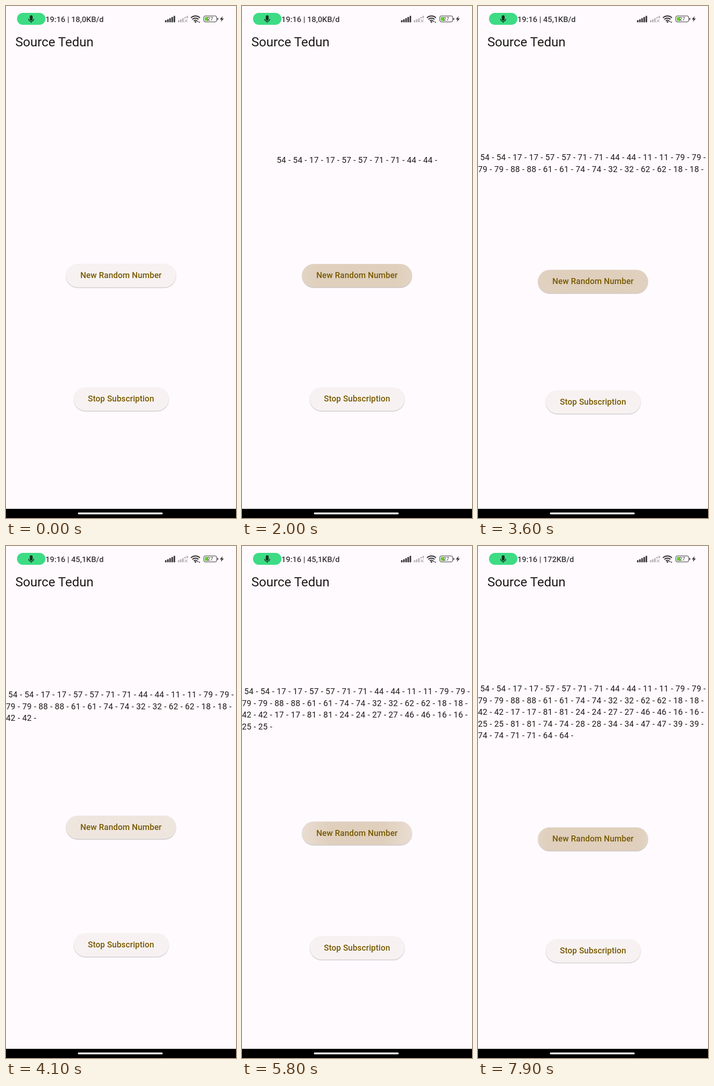
Write an HTML page that moves like this. It is 502x1116 px and loops after 8000 ms.

```html
<!DOCTYPE html>
<html lang="en">
<head>
<meta charset="utf-8">
<title>Number stream</title>
<style>
  html, body { margin: 0; width: 100%; height: 100%; overflow: hidden; }
  body {
    position: relative;
    background: #fffafe;
    color: #1d1b18;
    font-family: Roboto, sans-serif;
  }
  svg { position: absolute; left: 0; top: 0; }
  h1 {
    position: absolute; left: 20.4px; top: 60.6px; margin: 0;
    font-size: 28.1px; font-weight: 400; line-height: 36px; white-space: pre;
  }
  #list {
    position: absolute; left: 50%; top: 0; width: max-content;
    font-size: 17.9px; line-height: 25.56px; letter-spacing: .32px; white-space: pre;
  }
  .btn {
    position: absolute; top: 0; height: 51.1px; border-radius: 26px;
    background-color: #f7f2f1; color: #785900;
    font-size: 17.9px; font-weight: 500; line-height: 50.4px;
    letter-spacing: .128px; text-align: center; white-space: pre;
    box-shadow: 0 1px 2px rgba(0, 0, 0, .2), 0 1px 1px rgba(0, 0, 0, .1);
  }
  #add { left: 131px; width: 240px; }
  #stop { left: 147.5px; width: 207px; }
  #nav { position: absolute; left: 0; top: 1096px; width: 100%; height: 20px; background: #000; }
  #nav::after {
    content: ""; position: absolute; left: 157px; top: 8px;
    width: 185px; height: 4px; border-radius: 2px; background: #fff;
  }
</style>
</head>
<body>
<svg width="502" height="50" viewBox="0 0 502 50" fill="#3a383a" font-family="Roboto, sans-serif">
  <rect x="24" y="15" width="62" height="26" rx="13" fill="#3ddc84"/>
  <g fill="none" stroke="#17331f" stroke-linecap="round">
    <path d="M55 23.5v5" stroke-width="6.4"/>
    <path d="M49.4 28.5a5.6 5.2 0 0 0 11.2 0M55 34v2" stroke-width="1.6"/>
  </g>
  <text id="rate" x="86" y="35" font-size="17.1" font-weight="500"></text>
  <path d="M347 31h3.4v4.5h-3.4zM351.7 29h3.4v6.5h-3.4zM356.4 26.5h3.4v9h-3.4zM361.1 24h3.4v11.5h-3.4zM365.8 21.5h3.4v14h-3.4z"/>
  <g fill="#b9b5b9">
    <path d="M375 31h3.4v4.5h-3.4zM379.7 29h3.4v6.5h-3.4zM384.4 26.5h3.4v9h-3.4zM389.1 24h3.4v3h-3.4zM393.8 21.5h3.4v5h-3.4z"/>
    <path d="M390 29.5l6 6m0-6l-6 6" stroke="#b9b5b9" stroke-width="1.6"/>
  </g>
  <path d="M403.7 25.8a14 14 0 0 1 19.6 0M406.8 29.2a9.5 9.5 0 0 1 13.4 0M409.9 32.4a5.2 5.2 0 0 1 7.2 0"
    fill="none" stroke="#3a383a" stroke-width="2.4"/>
  <path d="M411 34.2a3.5 3.5 0 0 1 5 0l-2.5 2.8zM418.5 32l2 2.5h-4zM422 37l-2-2.5h4z"/>
  <rect x="431.7" y="21.7" width="28.2" height="13" rx="3.6" fill="none" stroke="#4a484a" stroke-width="1.3"/>
  <rect x="434" y="24" width="7.5" height="8.5" rx="1.5" fill="#62cf2c"/>
  <rect x="461.3" y="26" width="1.9" height="4.5" rx="1"/>
  <text x="445.8" y="32.2" font-size="11" text-anchor="middle">27</text>
  <path d="M473 22l-6.5 7.2h3.9l-1.7 5.6 6.8-7.6h-4z"/>
</svg>
<h1>Source Tedun</h1>
<div id="list"></div>
<div id="add" class="btn">New Random Number</div>
<div id="stop" class="btn">Stop Subscription</div>
<div id="nav"></div>
<script>
const LOOP = 8000, PER_LINE = 14, PRESS_LEAD = 60;
const values = ("54 17 57 71 44 11 79 79 88 61 74 32 62 18 42 17 81 24 27 46 16 25 " +
  "81 74 28 34 47 39 74 71 64").split(" ");
const times = [1090, 1290, 1490, 1690, 1890, 2090, 2290, 2490, 2690, 2890, 3050, 3210, 3390,
  3560, 3750, 4290, 4540, 4790, 5040, 5290, 5490, 5750, 5970, 6170, 6370, 6570, 6770, 6960,
  7160, 7460, 7760];

const $ = id => document.getElementById(id);
const list = $("list"), add = $("add"), stop = $("stop"), rate = $("rate");
const clamp = v => Math.max(0, Math.min(1, v));
const setText = (el, s) => { if (el.textContent !== s) el.textContent = s; };
const moveY = (el, y) => { el.style.transform = `translateY(${y}px)`; };

// Every value arrives twice; lines break after a fixed count.
function linesFor(count) {
  const items = values.slice(0, count).flatMap(v => [v, v]);
  const lines = [];
  for (let i = 0; i < items.length; i += PER_LINE) {
    lines.push(items.slice(i, i + PER_LINE).map(v => v + " - ").join(""));
  }
  if (lines.length) lines[0] = " " + lines[0];
  return lines;
}

// A soft disc that grows from the button's middle, holds, then fades.
function ripple(age) {
  const alpha = clamp(age / 70) * clamp((500 - age) / 250);
  const radius = 20 + 260 * clamp(age / 260);
  const color = a => `rgba(223, 207, 188, ${a.toFixed(3)})`;
  return `radial-gradient(circle at 50% 50%, ${color(alpha)} ${(radius * .45).toFixed(1)}px, ` +
    `${color(0)} ${radius.toFixed(1)}px)`;
}

function draw() {
  const t = performance.now() % LOOP;
  const lines = linesFor(times.filter(x => x <= t).length);
  const extra = Math.max(0, lines.length - 1);

  setText(list, lines.join("\n"));
  list.style.transform = `translate(-50%, ${323.4 - 6.39 * extra}px)`;
  moveY(add, 562.2 + 12.78 * extra);
  moveY(stop, 831.4 + 6.39 * extra);

  add.style.backgroundImage = times
    .map(x => t - x + PRESS_LEAD)
    .filter(age => age > 0 && age < 500)
    .map(ripple).join(", ") || "none";

  const speed = t < 2500 ? "18,0" : t < 6500 ? "45,1" : "172";
  setText(rate, `19:16 | ${speed}KB/d`);
  requestAnimationFrame(draw);
}
draw();
</script>
</body>
</html>
```
